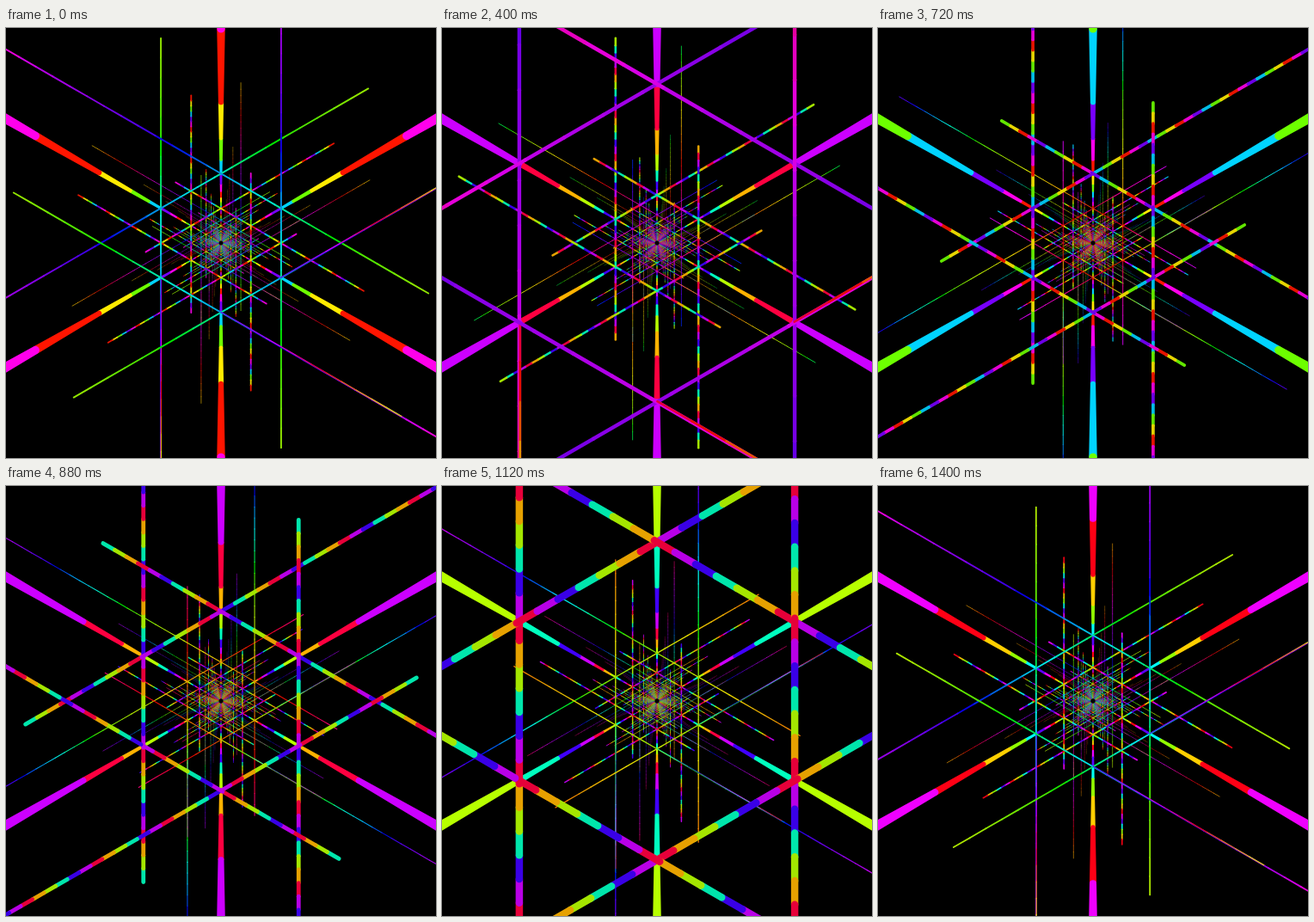
Write an HTML page with a canvas that moves like this. It is 500 px wide and 500 px high and loops after 1440 ms.

```html
<!DOCTYPE html>
<html lang="en">
<head>
<meta charset="utf-8">
<title>Hexagonal tunnel</title>
<style>
  html, body { margin: 0; width: 100%; height: 100%; overflow: hidden; background: #000; }
  canvas { display: block; width: 500px; height: 500px; }
</style>
</head>
<body>
<canvas id="stage" width="500" height="500"></canvas>
<script>
const ctx = document.getElementById('stage').getContext('2d');
const LOOP = 1440, STEP = 40, PERIOD = 720, CYCLE = 240;
const RADIUS = 79.6;   // projected radius at depth 1
const LEVELS = 26, NEAR = 0.06;
const X = Math.sqrt(3) / 2;

// Hue wheel: two entries per phase unit, six units per turn.
const HUES = [42, 62, 77, 103, 165, 203, 255, 275, 288, 313, 345, 375, 402];

function color(phase, light) {
  const p = (((phase % 6) + 6) % 6) * 2;
  const i = Math.floor(p);
  const hue = HUES[i] + (HUES[i + 1] - HUES[i]) * (p - i);
  return `hsl(${hue.toFixed(1)},100%,${light}%)`;
}

function eachSide(draw) {
  for (let j = 0; j < 6; j++) {
    ctx.save();
    ctx.rotate(j * Math.PI / 3);
    draw(j);
    ctx.restore();
  }
}

// One piece of the six rods running along the depth axis.
function rodPiece(m, shift, turn) {
  const far = (m + 1) / 6 - shift;
  if (far <= NEAR) return;
  const near = Math.max(m / 6 - shift, NEAR);
  const a = RADIUS / far, b = RADIUS / near, w = 0.019;
  ctx.fillStyle = color(m + turn - 2.667, 50);
  eachSide(() => {
    ctx.beginPath();
    ctx.moveTo(-a * w, a);
    ctx.lineTo(-b * w, b);
    ctx.lineTo(b * w, b);
    ctx.lineTo(a * w, a);
    ctx.arc(0, a, a * w, 0, Math.PI, true);
    ctx.fill();
  });
}

// A straight beam along y, made of short coloured pieces.
function beam(x, r, dir, from, to, len, phaseAt) {
  const count = Math.round((to - from) / len);
  for (let i = 0; i < count; i++) {
    const s = from + i * len;
    if (Math.min(Math.abs(s), Math.abs(s + len)) * r > 380) continue;
    ctx.strokeStyle = color(phaseAt(i, s), 45);
    ctx.beginPath();
    ctx.moveTo(x, dir * s * r);
    ctx.lineTo(x, dir * (s + len) * r);
    ctx.stroke();
  }
}

function thickLayer(r, turn) {
  ctx.lineWidth = r * 0.046;
  eachSide(() => beam(-X * r, r, -1, -2.02, 4.28, 0.15, i => turn - 1.667 - i));
}

function thinLayer(r, turn) {
  const width = r * 0.024;
  eachSide(j => {
    ctx.lineWidth = width;
    beam(-X * r, r, 1, -2.95, 6.99, 0.284, (i, s) => {
      const u = s + 2.95;
      return turn + 1.1 + 0.35 * u + 0.0175 * u * u;
    });
    if (j === 0 || j > 3) {
      ctx.lineWidth = width * 0.6;
      beam(-X * r + width * 0.2, r, 1, 0.5, 3.5, 0.25,
        (i, s) => turn + 3.1 + 1.2 * (s - 0.3));
    }
  });
}

function render(t) {
  const shift = t / PERIOD + 1 / 72;
  const turn = t / CYCLE;
  ctx.setTransform(1, 0, 0, 1, 0, 0);
  ctx.fillStyle = '#000';
  ctx.fillRect(0, 0, 500, 500);
  ctx.translate(250, 250);
  ctx.lineCap = 'round';
  for (let k = LEVELS; k > 0; k--) {
    for (let m = 6 * k - 1; m >= 6 * k - 6; m--) rodPiece(m, shift, turn);
    const z = k - shift;
    if (z > NEAR) (k % 2 ? thinLayer : thickLayer)(RADIUS / z, turn);
  }
}

let last = -1;
const start = performance.now();
function tick(now) {
  const step = Math.floor((Math.max(0, now - start) % LOOP) / STEP);
  if (step !== last) {
    last = step;
    render(step * STEP);
  }
  requestAnimationFrame(tick);
}
tick(start);
</script>
</body>
</html>
```
